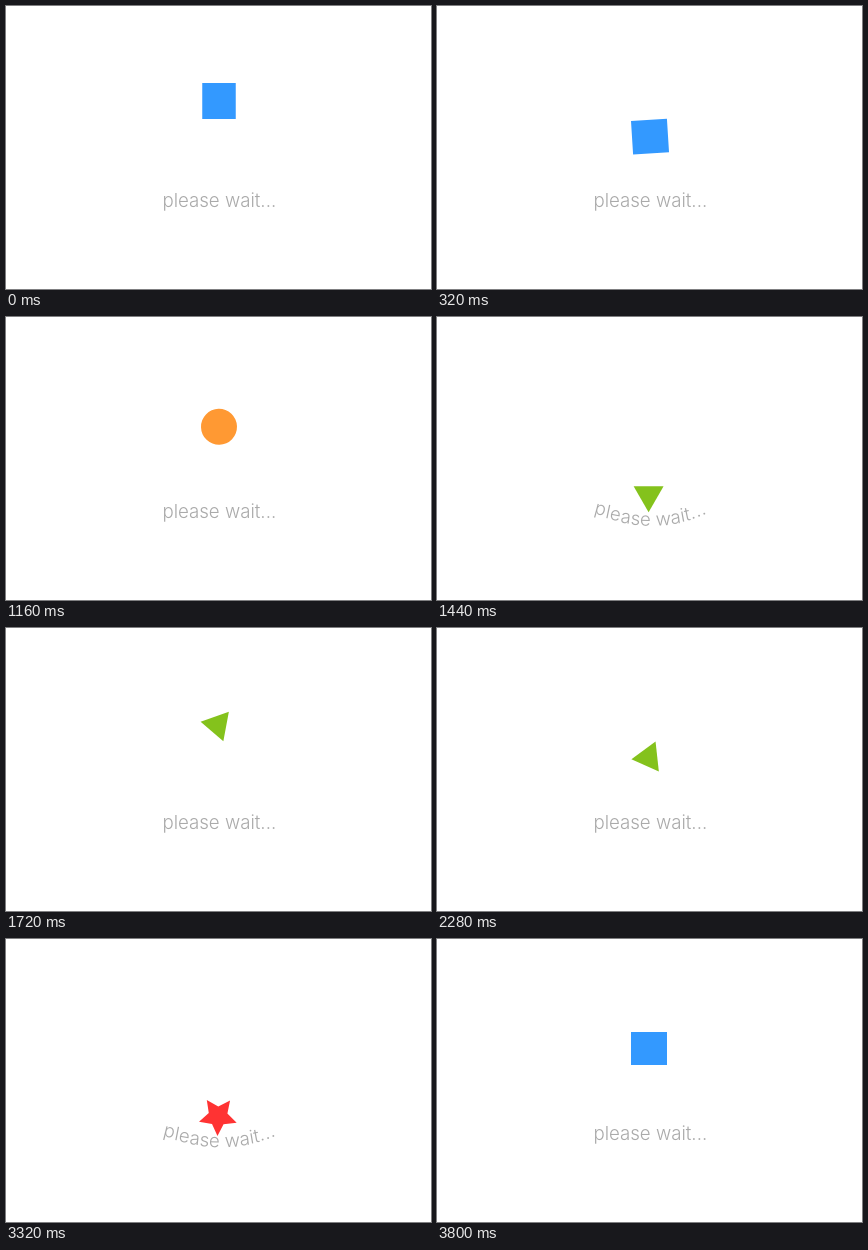
These frames come from a looping animation (425 px wide and 283 px high, 3.84 s). An HTML page:

```html
<!DOCTYPE html>
<html lang="en">
<head>
<meta charset="utf-8">
<title>Please wait</title>
<style>
  html, body { margin: 0; width: 100%; height: 100%; overflow: hidden; background: #fff; }
  svg { display: block; width: 425px; height: 283px; }
  text { font: 300 18.7px Inter, "Open Sans", sans-serif; fill: #aaa; }
</style>
</head>
<body>
<svg viewBox="0 0 425 283">
  <text id="label" x="156.4" y="201">please wait...</text>
  <path id="shape"/>
</svg>
<script>
const LOOP = 3840, FLOOR = 178, BASE = 201, MID = 213;
const label = document.getElementById('label');
const shape = document.getElementById('shape');
const starts = [...label.textContent].map((c, i) => label.getStartPositionOfChar(i).x);

// Closed polygon, first point up, radii used in turn
function polygon(n, ...radii) {
  const pts = [];
  for (let i = 0; i < n; i++) {
    const a = i / n * 2 * Math.PI, r = radii[i % radii.length];
    pts.push((r * Math.sin(a)).toFixed(2) + ',' + (-r * Math.cos(a)).toFixed(2));
  }
  return 'M' + pts.join('L') + 'Z';
}
const rect = (w, h) => `M${-w / 2},${-h / 2}h${w}v${h}h${-w}Z`;
const disc = r => `M${-r},0a${r},${r} 0 1 1 ${2 * r},0a${r},${r} 0 1 1 ${-2 * r},0Z`;

// Each flight: launch, apex and landing time, apex height, spin easing power
const flights = [
  { start: -480, apex: 0, end: 470, top: 95, x: 213, spin: 1.7, color: '#3399ff', d: rect(33.5, 36) },
  { start: 470, apex: 930, end: 1440, top: 95.5, x: 213, spin: 1.7, color: '#ff9933', d: disc(18) },
  { start: 1440, apex: 1920, end: 2440, top: 90.5, x: 211.6, spin: 1.7, color: '#84c21c', d: polygon(3, 17.3) },
  { start: 2440, apex: 2860, end: 3322, top: 94.7, x: 212, spin: 2, color: '#ff3333', d: polygon(10, 19.8, 9.8) },
  { start: 3322, apex: 3800, end: 4400, top: 109.5, x: 212, spin: 1.7, color: '#3399ff', d: rect(36, 33) }
];

// How far the line of text is pushed down, 1 at the deepest point
function sagAt(t, f, y) {
  const since = t - f.start;
  if (since < 125) return Math.cos(since / 125 * 1.5 * Math.PI) * (1 - since / 125);
  return t > f.apex ? Math.max(0, (y - 168) / 10) : 0;
}

// Letters keep their x, follow a parabola in y and lean along it
function bend(sag) {
  const pos = starts.map(x => (x - MID) / 55);
  label.setAttribute('y', pos.map(p => (BASE + sag * (8 - 12 * p * p)).toFixed(2)).join(' '));
  label.setAttribute('rotate', pos.map(p => (-16 * sag * (p + 0.08)).toFixed(2)).join(' '));
}

function draw(t) {
  const f = flights.find(f => t < f.end);
  const rising = t < f.apex;
  const u = rising ? (f.apex - t) / (f.apex - f.start) : (t - f.apex) / (f.end - f.apex);
  const y = f.top + (FLOOR - f.top) * Math.pow(u, rising ? 3 : 2.2);
  const turn = (rising ? 180 : -180) * Math.pow(u, f.spin);
  shape.setAttribute('d', f.d);
  shape.setAttribute('fill', f.color);
  shape.setAttribute('transform', `translate(${f.x} ${y.toFixed(2)}) rotate(${turn.toFixed(2)})`);
  bend(sagAt(t, f, y));
}

const begin = performance.now();
function tick() {
  const t = (performance.now() - begin) % LOOP;
  draw(Math.floor(t / 40) * 40);
  requestAnimationFrame(tick);
}
draw(0);
requestAnimationFrame(tick);
</script>
</body>
</html>
```
